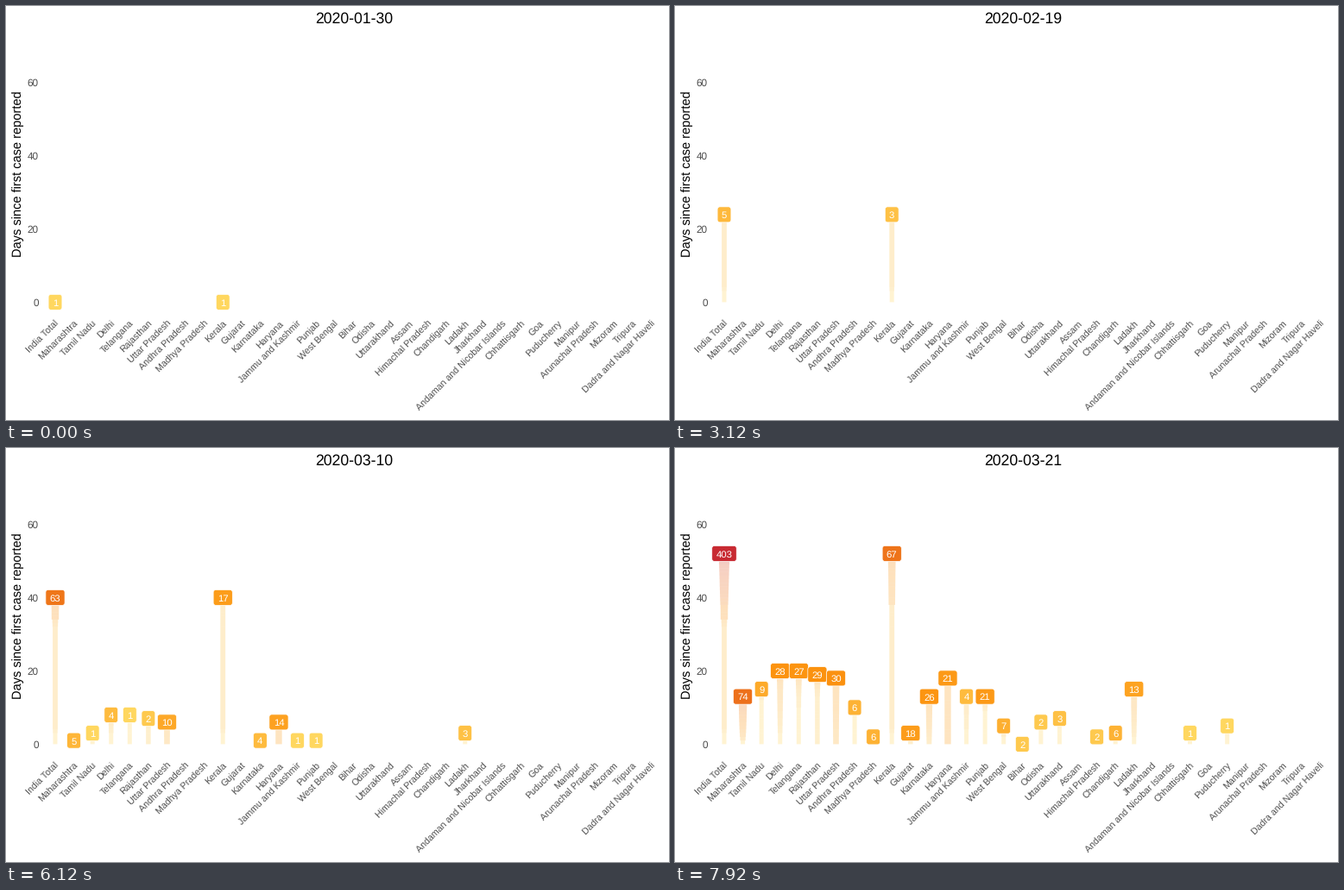
Recreate the animation shown at these times as a matplotlib script. Size 768 by 480 pixels, loop 8 s.

```python
import matplotlib.pyplot as plt
import numpy as np
from matplotlib.animation import FuncAnimation
from matplotlib.collections import PolyCollection
from matplotlib.colors import to_rgb
from matplotlib.patches import FancyBboxPatch

W, H, DPI = 768, 480, 96
PX = 72 / DPI              # points per pixel
TICK = 120                 # ms between picture changes
STEP, LOOP = 40, 8000      # ms
DAYS_PER_TICK = 0.786
START = np.datetime64("2020-01-30")
LAST = 52
REPORT_DAYS = [0, 3, 4, *range(32, LAST + 1)]
LABEL_SIZE = 11.38

plt.rcParams["font.family"] = "Liberation Sans"
plt.rcParams["text.hinting"] = "none"

STOPS = np.log([1, 28, 146, 403])
SHADES = np.array([to_rgb(c) for c in
                   ("#ffd75f", "#fc930f", "#e25824", "#c82a32")])


def outbreak(first, end, steady=0, begin=1):
    """Counts by day: a steady rise plus a surge in the last days."""
    def count(day):
        u = (day - first) / max(LAST - first, 1)
        rise = steady * u + (1 - steady) * u ** 7.5
        return int(begin + (end - begin) * rise + 1e-6)
    return {d: count(d) for d in REPORT_DAYS if d >= first}


def two_waves(second, end, steady, begin):
    """A small early cluster that holds until a second outbreak."""
    early = {d: min(1 + d // 2, 3) for d in REPORT_DAYS if d < second}
    return early | outbreak(second, end, steady, begin)


CASES = {
    "Maharashtra": outbreak(39, 74, 0.89),
    "Tamil Nadu": outbreak(37, 9),
    "Delhi": outbreak(32, 28, 0.35),
    "Telangana": outbreak(32, 27, 0.08),
    "Rajasthan": outbreak(33, 29, begin=2),
    "Uttar Pradesh": outbreak(34, 30, 0.44, 7),
    "Andhra Pradesh": outbreak(42, 6),
    "Madhya Pradesh": outbreak(50, 6, begin=4),
    "Kerala": two_waves(38, 67, 0.33, 15),
    "Gujarat": outbreak(49, 18, 0.5, 2),
    "Karnataka": outbreak(39, 26, 0.58, 3),
    "Haryana": outbreak(34, 21, 0.2, 14),
    "Jammu and Kashmir": outbreak(39, 4, 1.1),
    "Punjab": outbreak(39, 21),
    "West Bengal": outbreak(47, 7, 0.5),
    "Bihar": outbreak(52, 2, begin=2),
    "Odisha": outbreak(46, 2),
    "Uttarakhand": outbreak(45, 3),
    "Himachal Pradesh": outbreak(50, 2, begin=2),
    "Chandigarh": outbreak(49, 6, 0.5),
    "Ladakh": outbreak(37, 13, 0.87),
    "Chhattisgarh": outbreak(49, 1),
    "Puducherry": outbreak(47, 1),
}
CASES["India Total"] = {d: sum(c.get(d, 0) for c in CASES.values())
                        for d in REPORT_DAYS}

NAMES = ["India Total", "Maharashtra", "Tamil Nadu", "Delhi", "Telangana",
         "Rajasthan", "Uttar Pradesh", "Andhra Pradesh", "Madhya Pradesh",
         "Kerala", "Gujarat", "Karnataka", "Haryana", "Jammu and Kashmir",
         "Punjab", "West Bengal", "Bihar", "Odisha", "Uttarakhand", "Assam",
         "Himachal Pradesh", "Chandigarh", "Ladakh", "Jharkhand",
         "Andaman and Nicobar Islands", "Chhattisgarh", "Goa", "Puducherry",
         "Manipur", "Arunachal Pradesh", "Mizoram", "Tripura",
         "Dadra and Nagar Haveli"]


def x_at(i):
    return 57 + 21.58 * i


def y_at(days):
    return 343.4 - 4.25 * days


def shade(count):
    return np.array([np.interp(np.log(count), STOPS, ch) for ch in SHADES.T])


def trail_width(count):
    return 2.4 + 2.6 * count ** 0.25


def ease(p):
    return 4 * p ** 3 if p < 0.5 else 1 - 4 * (1 - p) ** 3


fig = plt.figure(figsize=(W / DPI, H / DPI), dpi=DPI, facecolor="white")
ax = fig.add_axes([0, 0, 1, 1])
ax.set_xlim(0, W)
ax.set_ylim(H, 0)
ax.axis("off")


def write(x, y, s, size, color, **kw):
    return ax.text(x, y, s, fontsize=size * PX, color=color, va="baseline",
                   rotation_mode="anchor", **kw)


title = write(402.8, 20, "", 17.6, "black", ha="center")
write(17.8, 194.2, "Days since first case reported", 14.67, "black",
      ha="center", rotation=90)
for v in (0, 20, 40, 60):
    write(37.7, y_at(v) + 4.3, str(v), 11.73, "#4d4d4d", ha="right")
for i, name in enumerate(NAMES):
    write(x_at(i) + 5.5, 369, name, 10.67, "#4d4d4d", ha="right", rotation=45)

trails = PolyCollection([], linewidths=0, snap=False, zorder=2)
ax.add_collection(trails)


class Marker:
    """Rounded count label riding on top of its trail."""

    def __init__(self, i, counts):
        first = min(counts)
        self.x = x_at(i)
        # rows of (tick, days since first case, count)
        self.rows = [(round(d / DAYS_PER_TICK), d - first, c)
                     for d, c in counts.items()]
        self.box = FancyBboxPatch(
            (0, 0), 1, 1, boxstyle="round,pad=0,rounding_size=2.9",
            ec="white", lw=0.7 * PX, zorder=10 + i)
        ax.add_patch(self.box)
        self.text = write(self.x, 0, "", LABEL_SIZE, "white", ha="center",
                          zorder=10 + i)

    def update(self, tick):
        past = [r for r in self.rows if r[0] <= tick]
        self.box.set_visible(bool(past))
        self.text.set_visible(bool(past))
        if not past:
            return []
        t0, y0, c0 = past[-1]
        t1, y1, c1 = self.rows[min(len(past), len(self.rows) - 1)]
        p = ease((tick - t0) / (t1 - t0)) if t1 > t0 else 0
        top = y0 + (y1 - y0) * p
        label = str(c0 if p < 0.5 else c1)

        w, h, y = 0.556 * LABEL_SIZE * len(label) + 9.5, 18, y_at(top)
        self.box.set_bounds(self.x - w / 2, y - h / 2, w, h)
        self.box.set_facecolor(shade(c0) * (1 - p) + shade(c1) * p)
        self.text.set_text(label)
        self.text.set_y(y + 4.3)

        levels = [r[1] for r in past] + [top]
        return [(self.x, lo, hi, r[2])
                for r, lo, hi in zip(past, levels, levels[1:]) if hi > lo]


markers = [Marker(i, CASES[name])
           for i, name in enumerate(NAMES) if name in CASES]


def bar(x, lo, hi, count):
    r = trail_width(count) / 2
    a, b = y_at(lo), y_at(hi)
    return [(x - r, a), (x + r, a), (x + r, b), (x - r, b)]


def draw(n):
    tick = n * STEP // TICK
    title.set_text(str(START + int(tick * DAYS_PER_TICK)))
    parts = [part for m in markers for part in m.update(tick)]
    trails.set_verts([bar(*part) for part in parts])
    trails.set_facecolor([(*shade(part[3]), 0.28) for part in parts])
    return []


anim = FuncAnimation(fig, draw, frames=LOOP // STEP, interval=STEP,
                     repeat=True, repeat_delay=0)
plt.show()
```
